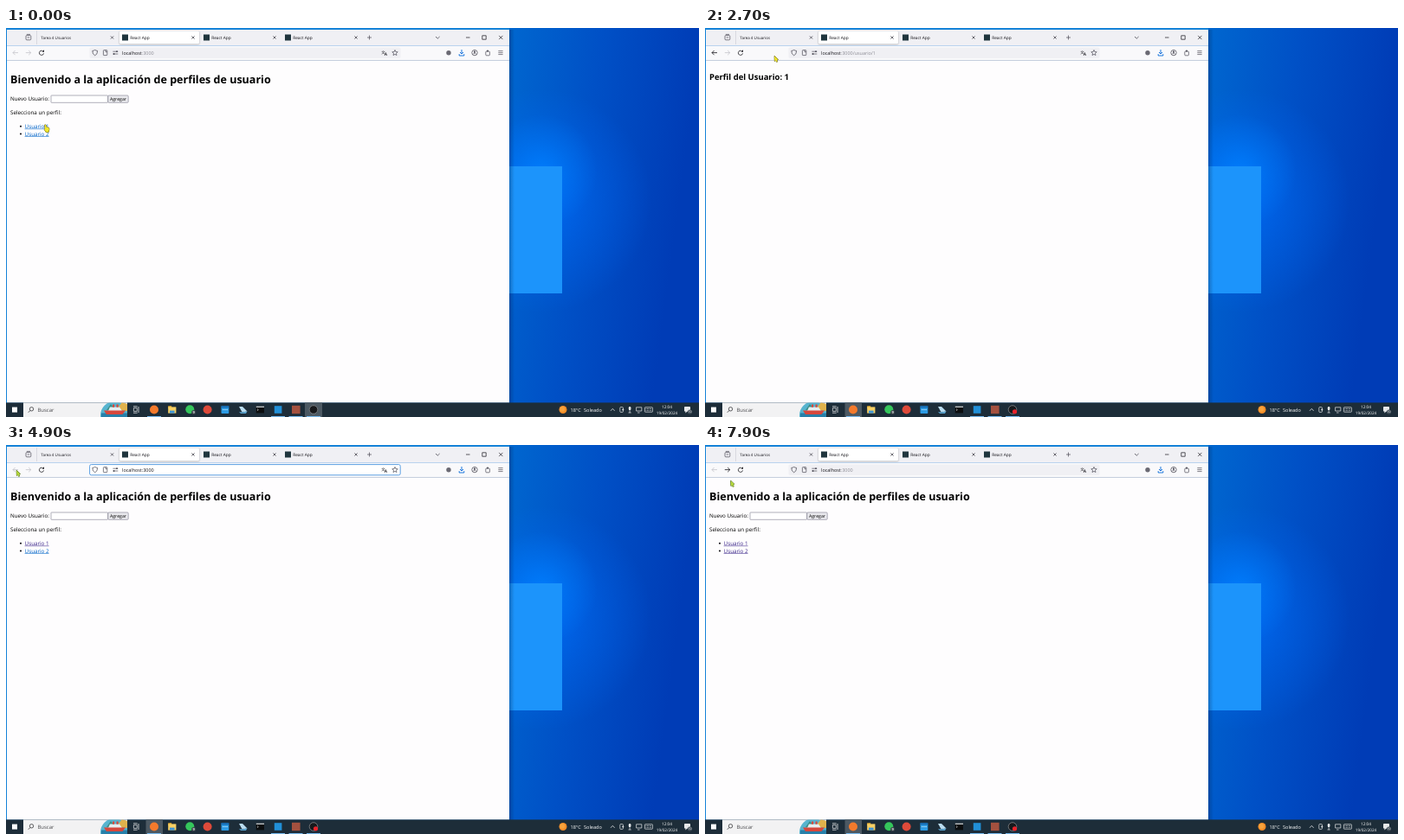
These frames come from a looping animation (800x450 px, 8 s). An HTML page with a canvas:

```html
<!DOCTYPE html>
<html lang="es">
<head>
<meta charset="utf-8">
<title>Perfiles de usuario</title>
<style>
html, body { margin: 0; width: 100%; height: 100%; overflow: hidden; background: #0048b8; }
canvas { display: block; width: 800px; height: 450px; }
</style>
</head>
<body>
<canvas id="stage" width="800" height="450"></canvas>
<script>
const ctx = document.getElementById('stage').getContext('2d');
ctx.textRendering = 'geometricPrecision';
const LOOP = 8000, STEP = 100;
const FONT = '"Open Sans", "Noto Sans", sans-serif';
const INK = '#15141a', ICON = '#4b4a55', FAINT = '#c3c3c9', BLUE = '#0078d7', LINK = '#0064c8', VISITED = '#3f2a8c';

// cursor path: time, x, y
const PATH = [
  [0, 44.5, 112], [500, 44.5, 112], [900, 42, 112], [1400, 40, 111], [1900, 40, 111],
  [2700, 80, 32], [3200, 198, 28], [3500, 198, 28], [3900, 171, 29], [4400, 22, 38],
  [4600, 12, 29], [4900, 12, 29], [5700, 67, 113], [6000, 44, 121], [6300, 44, 121],
  [7300, 33.5, 35], [7500, 12, 28], [7700, 12, 28], [7900, 29.5, 41]
];

const ROWS = [
  ['Procesos Elementales (2022-2023) 1º PRLM Repertorio de Herramientas Norte', 'classroom.google.com/u/1/c/NTQ1NTgzMDA0MjVz', '#2d9d4a'],
  ['Recibidos (128) - domelorta@qumel.test - Qumel', 'mail.google.com/mail/u/0/#inbox', '#e2463b'],
  ['Tolvrune', 'tolvrune.com', '#2761b8'],
  ['(214) Mirpalo', 'mirpalo.com', '#ee2222'],
  ['Drukop', 'drukop.com', '#1c2026'],
  ['lorvate', 'lorvate.es', '#26374f'],
  ['ZulmKRV', 'chat.openai.com', '#27b5cc']
];

function text(s, x, y, size, color = INK, weight = 400, align = 'left') {
  ctx.font = `${weight} ${size}px ${FONT}`;
  ctx.textAlign = align;
  ctx.fillStyle = color;
  ctx.fillText(s, x, y);
  return ctx.measureText(s).width;
}

function rect(x, y, w, h, color) {
  ctx.fillStyle = color;
  ctx.fillRect(x, y, w, h);
}

function round(x, y, w, h, r, fill, stroke, width = 0.7) {
  ctx.beginPath();
  ctx.roundRect(x, y, w, h, r);
  if (fill) { ctx.fillStyle = fill; ctx.fill(); }
  if (stroke) { ctx.strokeStyle = stroke; ctx.lineWidth = width; ctx.stroke(); }
}

function shadowBox(x, y, w, h, r, blur, alpha) {
  ctx.save();
  ctx.shadowColor = `rgba(0,0,0,${alpha})`;
  ctx.shadowBlur = blur;
  ctx.shadowOffsetY = 0.5;
  round(x, y, w, h, r, '#fff');
  ctx.restore();
}

function dot(x, y, r, color) {
  ctx.fillStyle = color;
  ctx.beginPath();
  ctx.arc(x, y, r, 0, 7);
  ctx.fill();
}

function ring(x, y, r, color, from = 0, to = 7, width = 0.75) {
  ctx.strokeStyle = color;
  ctx.lineWidth = width;
  ctx.beginPath();
  ctx.arc(x, y, r, from, to);
  ctx.stroke();
}

function line(color, width, ...pts) {
  ctx.strokeStyle = color;
  ctx.lineWidth = width;
  ctx.beginPath();
  for (let i = 0; i < pts.length; i += 2) ctx.lineTo(pts[i], pts[i + 1]);
  ctx.stroke();
}

function poly(color, ...pts) {
  ctx.fillStyle = color;
  ctx.beginPath();
  for (let i = 0; i < pts.length; i += 2) ctx.lineTo(pts[i], pts[i + 1]);
  ctx.closePath();
  ctx.fill();
}

function star(x, y, r, fill, stroke) {
  ctx.beginPath();
  for (let i = 0; i < 10; i++) {
    const a = i * Math.PI / 5 - Math.PI / 2, d = i % 2 ? r * 0.45 : r;
    ctx.lineTo(x + d * Math.cos(a), y + d * Math.sin(a));
  }
  ctx.closePath();
  if (fill) { ctx.fillStyle = fill; ctx.fill(); }
  if (stroke) { ctx.strokeStyle = stroke; ctx.lineWidth = 0.7; ctx.stroke(); }
}

function cross(x, y, r, color) {
  line(color, 0.7, x - r, y - r, x + r, y + r);
  line(color, 0.7, x - r, y + r, x + r, y - r);
}

function arrow(x, y, dir, color) {
  line(color, 0.8, x - 3, y, x + 3, y);
  line(color, 0.8, x + dir * 0.4, y - 2.6, x + dir * 3, y, x + dir * 0.4, y + 2.6);
}

function glow(x, y, r, color, alpha) {
  const g = ctx.createRadialGradient(x, y, 0, x, y, r);
  g.addColorStop(0, `rgba(${color},${alpha})`);
  g.addColorStop(0.5, `rgba(${color},${alpha * 0.45})`);
  g.addColorStop(1, `rgba(${color},0)`);
  rect(581, 0, 219, 434, g);
}

function desktop() {
  let g = ctx.createLinearGradient(575, 0, 800, 30);
  g.addColorStop(0, '#0068d0');
  g.addColorStop(0.5, '#0050c6');
  g.addColorStop(1, '#003cb6');
  rect(0, 0, 800, 450, g);
  glow(615, 200, 130, '0,108,250', 0.8);
  glow(618, 165, 65, '0,128,255', 0.8);
  rect(581, 160, 61, 147, '#1c94fb');
  rect(0, 0, 581, 2, '#1683d8');
  rect(0, 0, 1, 434, '#1683d8');
  g = ctx.createLinearGradient(581, 0, 587, 0);
  g.addColorStop(0, 'rgba(0,20,60,.3)');
  g.addColorStop(1, 'rgba(0,20,60,0)');
  rect(581, 2, 6, 432, g);
}

function tabs() {
  rect(1, 2, 580, 18.5, '#f0f0f4');
  round(23, 8.6, 5.8, 5.2, 1, null, ICON);
  line(ICON, 0.7, 23.8, 7.4, 28, 7.4);
  line(ICON, 0.7, 24.6, 11, 27.2, 11);
  line('#cfcfd8', 0.7, 35.5, 3, 35.5, 19);
  text('Tarea 4 Usuarios', 40.3, 12.9, 4.5);
  shadowBox(131, 3.5, 92, 15, 1.6, 2, 0.35);
  for (const x of [134, 228, 322]) {
    rect(x, 7.5, 7, 7, '#20363e');
    text('React App', x + 9.2, 12.9, 4.8);
  }
  for (const x of [122.5, 216, 310, 404]) cross(x, 11, 1.6, '#33323c');
  line(ICON, 0.7, 417, 11, 422, 11);
  line(ICON, 0.7, 419.5, 8.5, 419.5, 13.5);
  line(ICON, 0.8, 496, 10, 498.3, 12.2, 500.6, 10);
  line(INK, 0.7, 531, 11, 535.5, 11);
  round(549.8, 8.8, 4.4, 4.4, 0, null, INK);
  cross(571.3, 11, 2.1, INK);
}

function addressBar(s) {
  if (s.menu) {
    shadowBox(95, 20.5, 363, 145.5, 2, 4, 0.22);
    rect(96, 36.3, 361, 0.5, '#e6e6ea');
  } else if (s.focus) {
    round(96.6, 22.6, 358.6, 12.2, 1.8, '#fff', '#4b96e0', 0.9);
  } else {
    round(96.5, 22.5, 359, 12.5, 1.8, '#f0f0f4');
  }
  ctx.beginPath();
  ctx.moveTo(102.7, 25.4);
  ctx.quadraticCurveTo(104, 26.3, 105.6, 26.4);
  ctx.quadraticCurveTo(105.8, 30.4, 102.7, 31.8);
  ctx.quadraticCurveTo(99.6, 30.4, 99.8, 26.4);
  ctx.quadraticCurveTo(101.4, 26.3, 102.7, 25.4);
  ctx.strokeStyle = ICON;
  ctx.lineWidth = 0.75;
  ctx.stroke();
  round(112.4, 25.6, 4.4, 6, 0.7, null, ICON);
  line(ICON, 0.7, 115, 25.6, 115, 27.6, 116.8, 27.6);
  line(ICON, 0.7, 123.4, 27.2, 129.3, 27.2);
  line(ICON, 0.7, 123.4, 30, 129.3, 30);
  dot(128, 27.2, 0.9, ICON);
  dot(124.6, 30, 0.9, ICON);

  const size = 5.44, y = 30.7, dim = s.focus ? INK : '#8b8b94';
  let x = 134;
  x += text('localhost', x, y, size);
  x += text(':3000', x, y, size, dim);
  if (s.user) {
    x += text('/', x, y, size, dim);
    const tail = 'usuario/' + s.user;
    if (s.selected) {
      ctx.font = `400 ${size}px ${FONT}`;
      rect(x, 25, ctx.measureText(tail).width, 7.6, BLUE);
    }
    text(tail, x, y, size, s.selected ? '#fff' : dim);
  }

  text('文', 433.2, 29.8, 4.6, INK);
  text('A', 436.8, 31.8, 5, INK, 600);
  star(449, 28.8, 3.4, null, ICON);
}

function toolbar(s) {
  rect(1, 20.5, 580, 17, '#f9f9fb');
  rect(1, 37, 580, 0.7, '#cfcfd6');
  arrow(11, 28.6, -1, s.back ? INK : FAINT);
  arrow(25.8, 28.6, 1, s.forward ? INK : FAINT);
  ring(41, 28.8, 2.6, INK, 0.2, 5.4);
  poly(INK, 41.6, 27.5, 44, 25.2, 44, 27.8);

  dot(511, 28.7, 2.7, '#6a6973');
  line('#0068d9', 0.9, 526, 25, 526, 29.8);
  line('#0068d9', 0.9, 524, 28, 526, 30, 528, 28);
  line('#0068d9', 0.9, 523.2, 30.2, 523.2, 32, 528.8, 32, 528.8, 30.2);
  ring(541, 28.6, 3.2, ICON);
  dot(541, 27.7, 1.1, ICON);
  ring(541, 31, 1.8, ICON, 3.5, 5.9);
  round(553.8, 27, 4.6, 4.8, 0.8, null, ICON);
  dot(556, 26.4, 1, ICON);
  for (const y of [26.6, 28.6, 30.6]) line(ICON, 0.7, 568.3, y, 573.6, y);
}

function menu() {
  ROWS.forEach(([title, url, color], i) => {
    const y = 46.5 + i * 15;
    round(102.3, y - 3.2, 6.4, 6.4, 0.6, color);
    const end = 115 + text(title, 115, y + 2, 5.44);
    line('#6d6d76', 0.5, end + 2.3, y + 0.4, end + 7, y + 0.4);
    ctx.save();
    ctx.beginPath();
    ctx.rect(95, y - 7, 339.5, 14);
    ctx.clip();
    text(url, end + 10, y + 1.9, 4.85, '#0068d9');
    ctx.restore();
  });
  rect(95, 145.8, 363, 0.6, '#dedee4');
  text('Esta vez, busque con:', 99.3, 158, 5.35, '#777680');
  dot(167, 156, 2.7, '#4a9a55');
  dot(183.5, 156, 2.7, '#1677d2');
  dot(200.2, 156, 3.1, '#de6b3c');
  rect(215.4, 154.6, 3, 3, '#82787c');
  dot(234, 156, 2.5, '#4d4d52');
  star(250.3, 156, 3.7, '#0060df');
  round(263.8, 153.5, 6.5, 5, 0.8, null, ICON);
  ring(283.6, 156, 3, ICON);
  line(ICON, 0.7, 283.6, 154, 283.6, 156.2, 285.2, 156.8);
  ring(448.7, 156, 2.7, ICON, 0, 7, 1);
  ring(448.7, 156, 1, ICON);
}

function link(label, y, visited) {
  const color = visited ? VISITED : LINK;
  dot(17, y - 2, 1.05, INK);
  const w = text(label, 21.6, y, 6.26, color);
  rect(21.6, y + 0.8, w, 0.55, color);
}

function page(s) {
  rect(1, 37.6, 580, 396, '#fefdfe');
  if (s.user) {
    text('Perfil del Usuario: ' + s.user, 5, 60.3, 9.46, '#000', 700);
    return;
  }
  text('Bienvenido a la aplicación de perfiles de usuario', 5, 64.3, 12.54, '#000', 700);
  text('Nuevo Usuario:', 5, 84, 6.25, '#000');
  round(52, 78, 65.5, 8.3, 0.5, '#fff', '#8f8f9d');
  round(117.8, 78, 23.4, 8.3, 1, '#e9e9ed', '#8f8f9d');
  text('Agregar', 120, 84, 5.2, '#000');
  text('Selecciona un perfil:', 5, 100.4, 6.3, '#000');
  link('Usuario 1', 115.8, s.seen > 0);
  link('Usuario 2', 124.5, s.seen > 1);
}

function searchArt() {
  ctx.save();
  ctx.beginPath();
  ctx.rect(107, 433.5, 33, 16.5);
  ctx.clip();
  dot(125, 448, 16, '#57b4cf');
  poly('#3a8f88', 116, 442, 121, 435, 127, 442);
  poly('#e0b24c', 127, 442, 134, 433, 140, 435, 140, 443);
  rect(110, 445.5, 30, 5, '#277fa9');
  poly('#e6eef0', 118, 443, 120, 438.5, 131, 438.5, 134, 443);
  poly('#d6473c', 113, 442.6, 138, 442.6, 134.5, 447, 116, 447);
  rect(123, 435.5, 2.2, 3.2, '#d6473c');
  rect(127.5, 435.5, 2.2, 3.2, '#d6473c');
  ctx.restore();
}

function taskbar(s) {
  rect(0, 433.4, 800, 17, '#1d2d39');
  rect(20, 433.4, 120, 17, '#f2f2f3');
  rect(7, 438.6, 6, 6, '#fff');
  ring(29.5, 440.8, 2.2, '#2b2b2e');
  line('#2b2b2e', 0.8, 27.9, 442.5, 25.8, 444.7);
  text('Buscar', 36.5, 443.8, 5.95, '#4a4a4e');
  searchArt();

  if (s.recorder) rect(345, 433.4, 20, 17, '#4c5963');
  else rect(161.5, 433.4, 19.5, 17, '#4c5963');
  for (const x of [163, 306, 326.5, 347]) rect(x, 449, 16, 1, '#76b9ed');

  const pale = '#e6e8ea';
  round(147.4, 439.6, 3.8, 3.8, 0, null, pale);
  line(pale, 0.8, 147, 437.8, 151.6, 437.8);
  line(pale, 0.8, 147, 445.2, 151.6, 445.2);
  line(pale, 0.8, 153, 438, 153, 445);
  dot(171, 441.5, 5, '#f47a2c');
  rect(187.2, 437.2, 4, 3, '#e0a92e');
  rect(187.2, 438.4, 9.2, 7.2, '#f7d064');
  rect(189, 442.6, 5.6, 3, '#3f96d6');
  dot(212.3, 441.3, 5, '#35c65c');
  dot(216.6, 444.6, 2.5, '#3a444b');
  text('9', 216.6, 446.2, 4.2, '#fff', 600, 'center');
  dot(232.6, 441.5, 5, '#de4a3a');
  round(248.5, 437.3, 8.8, 8.6, 0.7, '#2c9be4');
  rect(248.5, 437.3, 8.8, 2, '#1468b0');
  for (const x of [250.3, 252.4, 254.5]) rect(x, 441, 1.1, 1.1, '#d9f0ff');
  poly('#b9dcf0', 269, 438, 273, 438, 278.5, 443.5, 272.6, 444.5);
  poly('#5aa4d0', 269, 444, 272.6, 444.5, 278.5, 443.5, 277, 446, 271, 446);
  rect(288.8, 437.6, 9.2, 7.8, '#0b0d0e');
  rect(288.8, 437.6, 9.2, 1.4, '#bfc5c9');
  line('#fff', 0.6, 290, 440.5, 291.3, 441.6, 290, 442.7);
  rect(309.8, 437.2, 8.6, 8.6, '#2190d8');
  rect(330, 436.8, 9.6, 9.4, '#a4513f');
  dot(355, 441.5, 5.1, '#17191c');
  ring(355, 441.5, 4.8, '#a8adb1', 0, 7, 0.6);
  if (!s.recorder) dot(357.5, 443.8, 2.6, '#e8232b');

  dot(643, 441.5, 4.5, '#f28c28');
  dot(642.4, 441, 3, '#f8a33c');
  text('18°C', 651.5, 443.7, 5.5, '#fff');
  text('Soleado', 667, 443.7, 5.55, '#fff');
  line(pale, 0.8, 698, 442.8, 700.3, 440.4, 702.6, 442.8);
  round(708.8, 438.6, 3.6, 5.8, 0.8, null, pale);
  dot(712.3, 441.5, 1, pale);
  round(718.8, 438, 2.6, 4.3, 1.3, pale);
  line(pale, 0.7, 720.1, 442.4, 720.1, 445);
  line(pale, 0.7, 718.5, 445, 721.7, 445);
  round(727.6, 438.8, 6.2, 4.2, 0, null, pale);
  line(pale, 0.7, 729, 445, 731.6, 445);
  round(737.4, 438.8, 9, 5.4, 0.5, null, pale);
  ctx.setLineDash([0.8, 0.6]);
  for (const y of [440.5, 442.4]) line(pale, 0.7, 738.6, y, 745.4, y);
  ctx.setLineDash([]);
  text('12:04', 763, 439.7, 4.7, '#fff', 400, 'center');
  text('19/02/2024', 763, 447.2, 4.6, '#fff', 400, 'center');
  round(783, 438, 7, 5.4, 0.4, pale);
  poly(pale, 784.4, 443, 787, 443, 784.4, 445.4);
  dot(789.5, 444, 2.6, '#44515b');
  text('10', 789.5, 445.3, 3.4, '#fff', 400, 'center');
}

function place(t) {
  const i = Math.max(1, PATH.findIndex(p => p[0] >= t));
  const [t0, x0, y0] = PATH[i - 1], [t1, x1, y1] = PATH[i];
  const u = (t - t0) / (t1 - t0), k = u * u * (3 - 2 * u);
  return [x0 + (x1 - x0) * k, y0 + (y1 - y0) * k];
}

function cursor(t, s) {
  const [x, y] = place(t);
  const overLink = !s.user && x > 21 && x < 50 && y > 109 && y < 126;
  const yellow = t < 1000 || t >= 2000 && t < 3700;
  ctx.save();
  ctx.translate(x, y);
  ctx.beginPath();
  const shape = overLink
    ? [0.2, 0, 1.5, 0, 2, 2.6, 5, 3.4, 5.4, 5, 4.6, 8.6, 1.7, 8.6, -0.3, 5.4, 0.6, 4.6]
    : [0.2, 0.3, 0.4, 6.4, 1.7, 5.4, 2.7, 7.4, 3.7, 6.9, 2.8, 4.9, 4.5, 4.4];
  for (let i = 0; i < shape.length; i += 2) ctx.lineTo(shape[i], shape[i + 1]);
  ctx.closePath();
  ctx.lineJoin = 'round';
  ctx.lineWidth = 1;
  ctx.strokeStyle = yellow ? '#5a5418' : '#4a6420';
  ctx.stroke();
  ctx.fillStyle = yellow ? '#f0e72c' : '#b4d838';
  ctx.fill();
  ctx.restore();
}

function stateAt(t) {
  const user = t >= 500 && t < 4800 ? 1 : t >= 6200 && t < 7700 ? 2 : 0;
  return {
    user,
    recorder: t < 500,
    seen: t < 500 ? 0 : t < 6200 ? 1 : 2,
    back: user > 0,
    forward: t >= 7700,
    menu: t >= 3400 && t < 4800,
    focus: t >= 3400 && t < 6200,
    selected: t >= 3900 && t < 4800
  };
}

function draw(t) {
  const s = stateAt(t);
  desktop();
  page(s);
  tabs();
  toolbar(s);
  addressBar(s);
  if (s.menu) menu();
  taskbar(s);
  cursor(t, s);
}

function tick() {
  const t = performance.now() % LOOP;
  draw(Math.floor(t / STEP) * STEP);
  requestAnimationFrame(tick);
}
draw(0);
requestAnimationFrame(tick);
</script>
</body>
</html>
```
